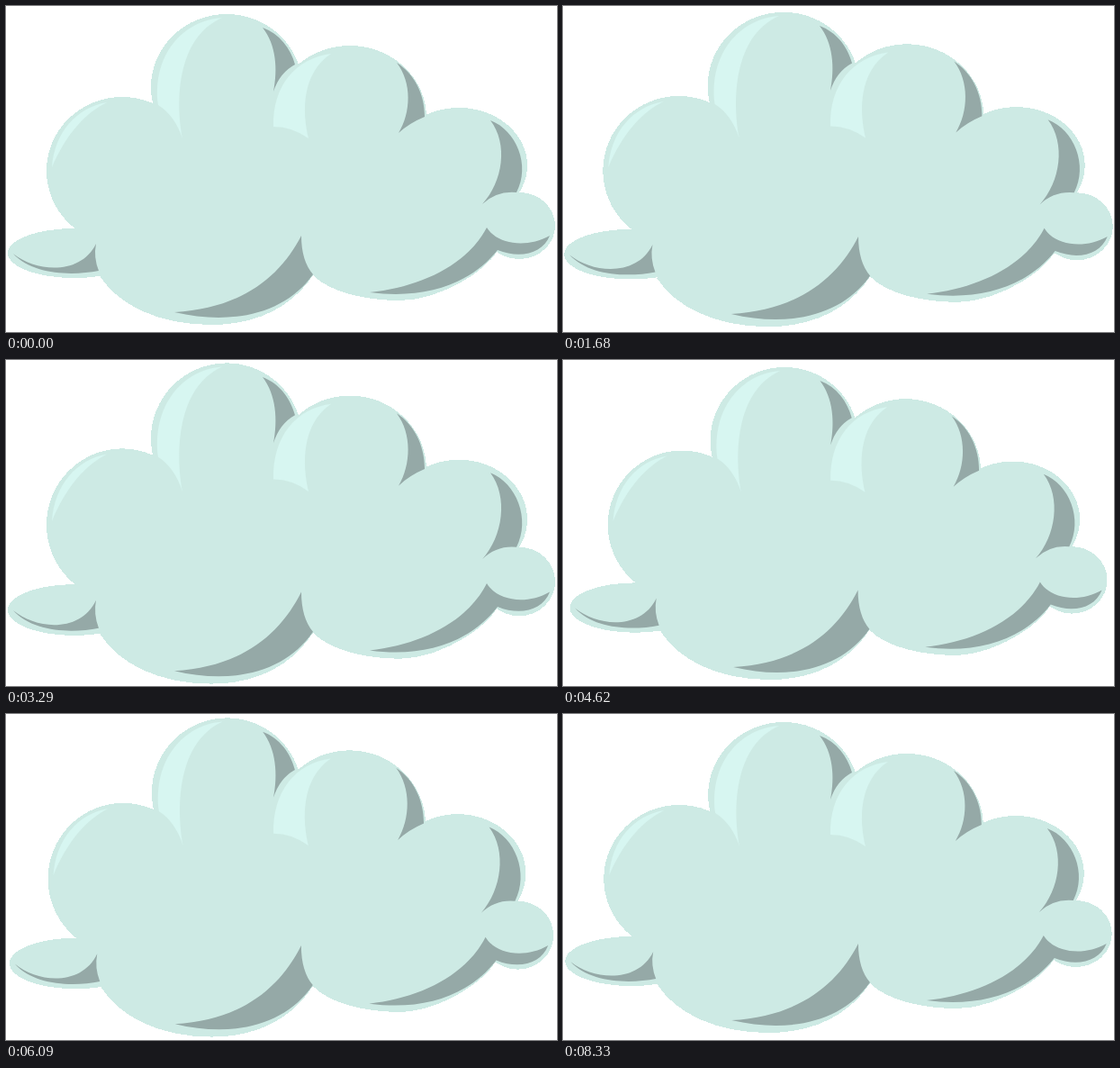
These frames come from a looping animation (612 by 362 pixels, 8.4 s). An HTML page:

```html
<!DOCTYPE html>
<html lang="en">
<head>
<meta charset="utf-8">
<title>Cloud</title>
<style>
html, body { margin: 0; width: 100%; height: 100%; overflow: hidden; background: #fff; }
svg { display: block; }
</style>
</head>
<body>
<svg width="612" height="362" viewBox="0 0 612 362">
  <g id="cloud">
    <g fill="#cdeae4" shape-rendering="crispEdges">
      <ellipse cx="245" cy="90" rx="84" ry="81"/>
      <ellipse cx="382" cy="124" rx="85" ry="80"/>
      <ellipse cx="503" cy="177" rx="76" ry="64"/>
      <ellipse cx="129" cy="183" rx="84" ry="82"/>
      <ellipse cx="570" cy="244" rx="40" ry="37"/>
      <ellipse cx="76" cy="274.5" rx="74" ry="27.5"/>
      <path d="M105 301C125 332 170 354 228 354S322 328 341 299
        C360 318 400 327 438 327S528 300 546 272L530 180 380 100 245 90 129 183Z"/>
    </g>
    <g fill="#d7f6f1">
      <path d="M51 179C54 140 78 113 112 107C88 119 67 142 51 179Z"/>
      <path d="M240 13C197 16 162 54 169 110Q187 121 196 147C188 105 190 35 240 13Z"/>
      <path d="M361 53C322 58 296 88 297 134Q318 134 336 147C329 118 328 75 361 53Z"/>
    </g>
    <g fill="#95a9a7">
      <path d="M285 24C304 31 316 47 321 65Q304 74 297 95C302 70 300 43 285 24Z"/>
      <path d="M434 63C453 75 465 97 465 123Q448 130 436 141C450 118 451 85 434 63Z"/>
      <path d="M538 127C567 138 583 177 567 207Q545 205 529 220C552 195 558 153 538 127Z"/>
      <path d="M404 318C460 312 512 288 534 246C545 264 577 270 604 255
        C596 275 571 281 546 271C516 309 465 326 404 318Z"/>
      <path d="M187 340C262 336 305 300 328 255Q328 283 341 298C310 342 251 355 187 340Z"/>
      <path d="M8 275C34 296 83 299 100 264Q97 279 103 294C72 300 29 298 8 275Z"/>
    </g>
  </g>
</svg>
<script>
const LOOP = 8400, STEP = 70, CX = 306, CY = 181.5;
const cloud = document.getElementById('cloud');

// Growth of the half width and half height in px, at even steps over the loop
const wide = [0, -.5, 2.5, -2.5, -1, 0, -3, -6.2, -1.5, -3, -11, -5.5];
const tall = [0, 4.5, 4.5, -1, 4.5, 5.5, 3, .5, 4.5, 4, -.5, 3];

// Closed Catmull-Rom curve through the points, phase 0..1
function wobble(points, phase) {
  const n = points.length, i = Math.floor(phase * n), u = phase * n - i;
  const [a, b, c, d] = [-1, 0, 1, 2].map(k => points[(i + k + n) % n]);
  return b + u / 2 * (c - a + u * (2 * a - 5 * b + 4 * c - d + u * (3 * (b - c) + d - a)));
}

const start = performance.now();
function draw() {
  const t = Math.floor((performance.now() - start) % LOOP / STEP) * STEP;
  const sx = 1 + wobble(wide, t / LOOP) / 303.5;
  const sy = 1 + wobble(tall, t / LOOP) / 172.5;
  cloud.setAttribute('transform',
    `translate(${CX} ${CY}) scale(${sx} ${sy}) translate(${-CX} ${-CY})`);
  requestAnimationFrame(draw);
}
draw();
</script>
</body>
</html>
```
